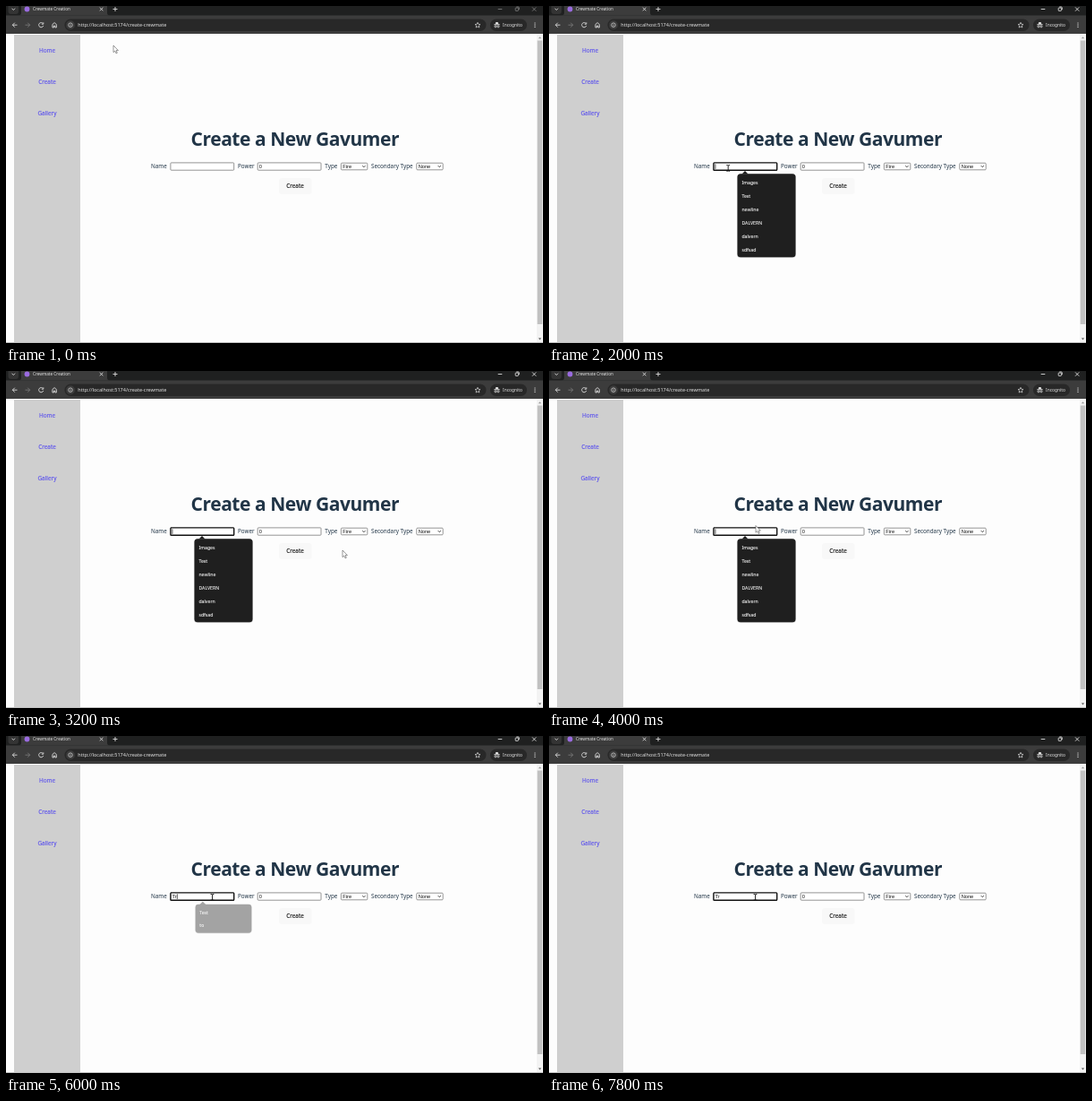
Recreate the animation shown at these times as an HTML page. Size 600 by 376 pixels, loop 8 s.

```html
<!DOCTYPE html>
<html lang="en">
<head>
<meta charset="utf-8">
<title>Create form</title>
<style>
  html, body { margin: 0; width: 100%; height: 100%; overflow: hidden; background: #fdfdfd; }
  svg { display: block; width: 100vw; height: 100vh; }
  text { font-family: "Noto Sans", "Open Sans", sans-serif; white-space: pre; }
  .mid { text-anchor: middle; }
  .link { font-size: 6.4px; font-weight: 500; fill: #5a50ee; stroke: #5a50ee; stroke-width: .12; }
  .label { font-size: 6.3px; fill: #213547; }
  .field { font-family: "Liberation Sans", Arial, sans-serif; font-size: 5.7px; fill: #111; }
  .box { fill: #fff; stroke: #7a7a7a; stroke-width: .8; }
  .icon { fill: none; stroke: #dcdcdc; stroke-width: .9; }
  .item { font-size: 5.2px; font-weight: 500; fill: #f0f0f0; stroke: #f0f0f0; stroke-width: .1; }
</style>
</head>
<body>
<svg viewBox="0 0 600 376">
  <rect width="600" height="376" fill="#fdfdfd"/>

  <!-- browser frame -->
  <rect width="600" height="12" fill="#1f2020"/>
  <rect y="10.5" width="600" height="20.5" fill="#3c3c3c"/>
  <path d="M14 10.5q3 0 3-3V0H113V7.500q0 3 3 3z" fill="#3c3c3c"/>
  <rect x="2.500" y="-3" width="11.500" height="12" rx="3" fill="#343434"/>
  <rect x="65.500" y="14.500" width="471" height="13.500" rx="6.700" fill="#282828"/>
  <rect x="541" y="14.500" width="41" height="13.500" rx="6.700" fill="#282828"/>
  <circle cx="23.500" cy="3.500" r="2.900" fill="#9a6be0"/>
  <circle cx="72" cy="21.200" r="5" fill="#3c3c3c"/>
  <text x="30" y="5.200" font-size="4.650" fill="#e4e4e4">Crewmate Creation</text>
  <text x="80.300" y="23.100" font-size="5.500" fill="#e4e4e4">http://localhost:5174/create-crewmate</text>
  <text x="555" y="23" font-size="4.900" fill="#e4e4e4">Incognito</text>
  <g class="icon">
    <path d="M6.500 2.700l1.800 1.800 1.800-1.800M104.800 1.700l3.600 3.600m0-3.600l-3.600 3.600M119.500 3.500h5M122 1v5"/>
    <path d="M12.500 21.200H7.300m2.500-2.500l-2.500 2.500 2.500 2.500"/>
    <path d="M21.500 21.200h5.200m-2.500-2.500l2.500 2.500-2.500 2.500" stroke="#777"/>
    <path d="M41.300 19.600A2.600 2.600 0 1 0 41.700 22M41.800 18.300v1.900h-2"/>
    <path d="M51.900 24v-3.500l2.200-1.900 2.200 1.900V24h-1.500v-1.900h-1.400V24z"/>
    <circle cx="72" cy="21.200" r="2.300" stroke-width=".7"/>
    <path d="M72 20.900v1.500M72 19.800v.6" stroke-width=".7"/>
    <path d="M527 18.300l.85 2 2.150.2-1.600 1.450.5 2.100-1.900-1.100-1.900 1.100.5-2.100L524 20.500l2.150-.2z" stroke-width=".7"/>
    <path d="M545.300 20.700h6.400"/>
    <circle cx="547" cy="22.800" r="1.100" stroke-width=".8"/>
    <circle cx="550" cy="22.800" r="1.100" stroke-width=".8"/>
  </g>
  <path d="M546.700 20.300l.6-2.300h2.400l.6 2.300z" fill="#dcdcdc"/>
  <path d="M591 18.400v1.100m0 1.100v1.100m0 1.100v1.100" stroke="#dcdcdc" stroke-width="1.100"/>
  <g id="controls" fill="none" stroke-width=".8">
    <path d="M549.700 3.500h4.600M588 1.400l4.300 4.300m0-4.300l-4.300 4.300"/>
    <rect x="569.200" y="2" width="3.200" height="3.400" rx=".6"/>
    <path d="M570.300 1h2q1 0 1 1v2.200"/>
  </g>

  <!-- page -->
  <rect x="9" y="32" width="74" height="344" fill="#cfcfcf"/>
  <rect x="593" y="31" width="7" height="345" fill="#f3f3f3"/>
  <rect x="593.700" y="38.500" width="5.600" height="316.500" fill="#c1c1c1"/>
  <path d="M594.800 36.200l1.700-2 1.700 2z" fill="#999"/>
  <path d="M594.800 370.500l1.700 2 1.700-2z" fill="#555"/>
  <rect y="375" width="600" height="1" fill="#c4c4c4"/>
  <g class="mid">
    <text class="link" x="46" y="52.300">Home</text>
    <text class="link" x="46" y="87.300">Create</text>
    <text class="link" x="46" y="122.300">Gallery</text>
    <text x="322.800" y="155.700" font-size="21" font-weight="700" letter-spacing="-.45" fill="#213547">Create a New Gavumer</text>
    <rect x="305" y="192" width="36.500" height="18" rx="3.300" fill="#f8f8f8"/>
    <text x="323" y="203.400" font-size="6.400" font-weight="500" fill="#111" stroke="#111" stroke-width=".12">Create</text>
  </g>
  <text class="label" x="162" y="180.900">Name</text>
  <text class="label" x="259" y="180.900">Power</text>
  <text class="label" x="356.300" y="180.900">Type</text>
  <text class="label" x="408" y="180.900">Secondary Type</text>
  <rect id="name" class="box" x="183.900" y="174.900" width="70.800" height="8.300" rx=".8"/>
  <rect class="box" x="281.200" y="174.900" width="70.800" height="8.300" rx=".8"/>
  <rect class="box" x="374.400" y="175.200" width="29.400" height="7.600" rx="1"/>
  <rect class="box" x="458.800" y="175.200" width="29.400" height="7.600" rx="1"/>
  <path d="M398.300 178.100l1.600 1.700 1.600-1.700M482.700 178.100l1.600 1.700 1.600-1.700" fill="none" stroke="#222" stroke-width=".8"/>
  <text class="field" x="282.800" y="181">0</text>
  <text class="field" x="376.300" y="181">Fire</text>
  <text class="field" x="460.700" y="181">None</text>
  <text class="field" id="value" x="185.600" y="181"></text>
  <path id="caret" stroke="#111" stroke-width=".7"/>
  <g id="menu"></g>
  <path id="arrow" d="M0 0V7.700L1.800 6.100 3 8.900 4.300 8.300 3.100 5.600H5.400Z" fill="#fff" stroke="#555" stroke-width=".6"/>
  <path id="beam" d="M-1.900-3.300H-.5L0-2.900.5-3.300H1.900M0-2.900V2.900M-1.900 3.300H-.5L0 2.900.5 3.300H1.900" fill="none" stroke="#111" stroke-width=".9"/>
</svg>
<script>
const LOOP = 8000, STEP = 200;
const FOCUS = 1800, OPEN = 2000, KEY_T = 5600, FILTER = 5800, KEY_R = 6000, CLOSED = 6200;
const ALL = ["Images", "Test", "newline", "DALVERN", "dalvern", "sdfsad"];
const MATCHES = ["Test", "to"];

// pointer stops: time, x, y
const PATH = [
  [0, 120, 44], [200, 120, 44], [600, 461, 194], [1200, 191.5, 178], [1800, 191.5, 178],
  [2800, 275, 206], [3200, 376, 200], [3800, 231, 172.5], [4200, 231, 172.5], [4600, 230.5, 179.8]
];
const $ = id => document.getElementById(id);
const show = (el, on) => el.setAttribute("visibility", on ? "visible" : "hidden");
const ease = p => p * p * (3 - 2 * p);

function pointerAt(t) {
  const i = PATH.findIndex(k => k[0] > t);
  if (i < 0) return PATH[PATH.length - 1].slice(1);
  const [t0, x0, y0] = PATH[i - 1], [t1, x1, y1] = PATH[i];
  const p = ease((t - t0) / (t1 - t0));
  return [x0 + (x1 - x0) * p, y0 + (y1 - y0) * p];
}

function menuMarkup(items) {
  const height = items.length * 15 + 3;
  return `<rect x="210" y="187.500" width="66" height="${height + .5}" rx="4" fill="#000" opacity=".18"/>
    <path d="M215.500 187.500L219 184l3.500 3.500z" fill="#1f1f1f"/>
    <rect x="210.500" y="187.200" width="65" height="${height}" rx="3.500" fill="#1f1f1f"/>` +
    items.map((s, i) => `<text class="item" x="215.400" y="${198.5 + i * 15}">${s}</text>`).join("");
}

let menuItems;
function drawMenu(t) {
  const menu = $("menu"), items = t < FILTER ? ALL : MATCHES;
  const fading = t >= KEY_R;
  if (items !== menuItems) menu.innerHTML = menuMarkup(menuItems = items);
  show(menu, t >= OPEN && t < CLOSED);
  menu.setAttribute("opacity", fading ? .4 : 1);
  menu.setAttribute("transform", fading ? "translate(243 204) scale(.965) translate(-243 -204)" : "");
}

function drawField(t) {
  const focused = t >= FOCUS;
  const text = t < KEY_T ? "" : t < KEY_R ? "T" : "Tr";
  const since = t - (text === "Tr" ? KEY_R : text ? KEY_T : FOCUS);
  const x = 185.9 + [0, 3.5, 5.4][text.length];
  $("name").style.stroke = focused ? "#101010" : "#7a7a7a";
  $("name").style.strokeWidth = focused ? 1.4 : .8;
  $("value").textContent = text;
  $("caret").setAttribute("d", `M${x} 176.300v5.600`);
  show($("caret"), focused && since % 1000 < 500);
  $("controls").setAttribute("stroke", focused ? "#f0f0f0" : "#858585");
}

function drawPointer(t) {
  const [x, y] = pointerAt(t);
  const overField = y > 174 && y < 184 && (x > 184 && x < 255 || x > 281 && x < 352);
  for (const id of ["arrow", "beam"]) {
    $(id).setAttribute("transform", `translate(${x} ${y})`);
    show($(id), overField === (id === "beam"));
  }
}

function draw(time) {
  const t = Math.floor(time % LOOP / STEP) * STEP;
  drawField(t);
  drawMenu(t);
  drawPointer(t);
}

function tick(now) {
  draw(now);
  requestAnimationFrame(tick);
}
draw(0);
requestAnimationFrame(tick);
</script>
</body>
</html>
```
